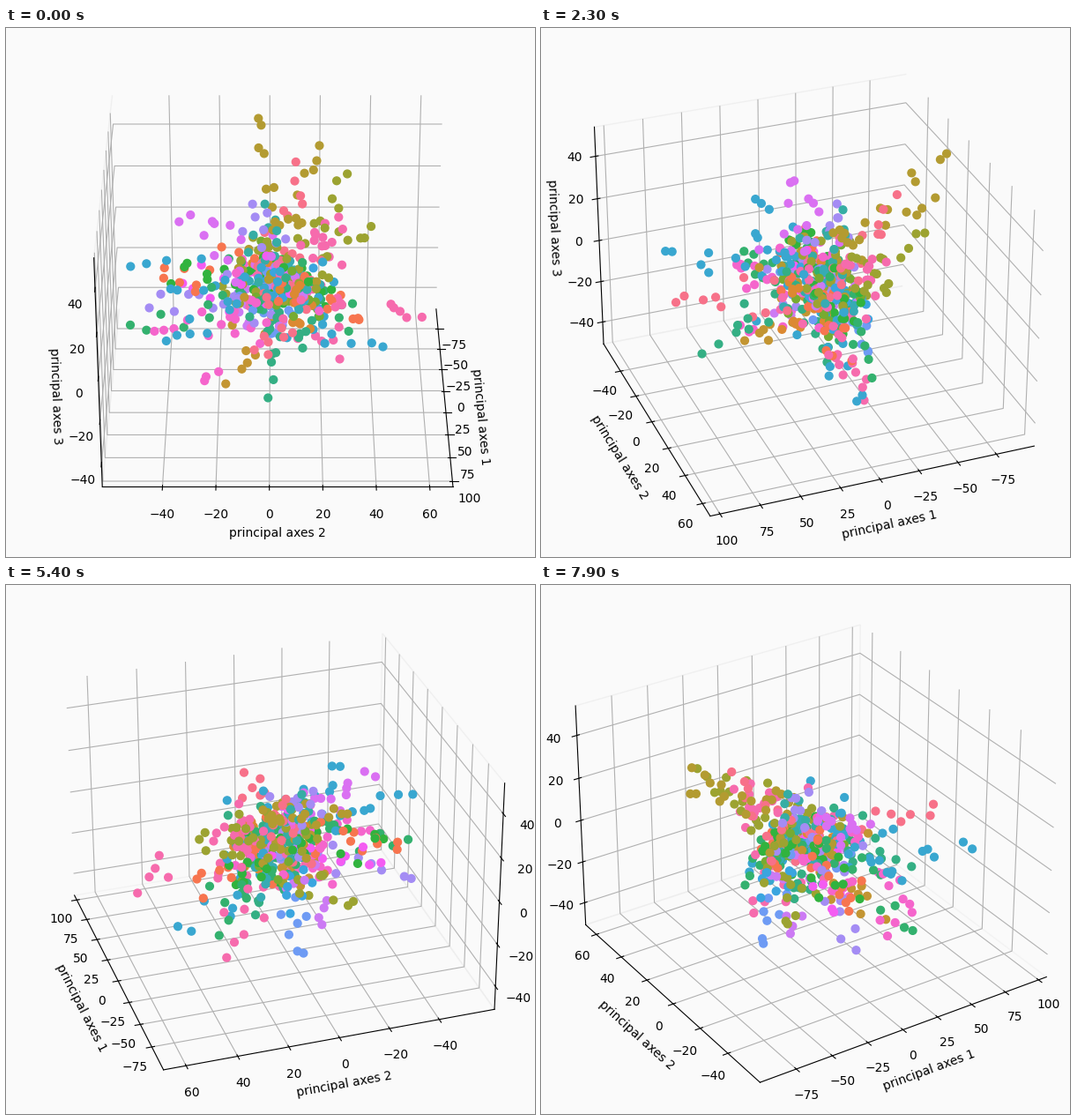
Recreate the animation shown at these times as a matplotlib script. Size 600 by 600 pixels, loop 8 s.

```python
import numpy as np
import matplotlib.pyplot as plt
from matplotlib.animation import FuncAnimation

FRAMES, INTERVAL, STEP = 80, 100, 3   # degrees of azimuth per frame
BG = "#fafafa"

# Every class fans out from a shared core towards one or more tips.
CORE = np.array([2, 4, 4])
SPREAD = np.array([15, 9, 8])
PER_ARM = 15
TIPS = {
    "#f77189": [(-42, 10, 38), (90, -3, 2)],
    "#f7754f": [(9, 38, -15), (-15, -42, -3)],
    "#dc8932": [(25, 10, -10)],
    "#c39532": [(32, -14, -32)],
    "#b39b31": [(-87, -4, 47), (-65, 19, 42)],
    "#9ca331": [(-50, 28, 33), (-22, 41, 18), (-33, -18, -18)],
    "#77ab31": [(5, 20, -10)],
    "#31b33e": [(-12, -38, -1), (-12, 22, -12)],
    "#33b16e": [(-20, 33, -26), (14, -52, -12)],
    "#34af84": [(70, 2, -23), (-2, 12, -31)],
    "#36ada4": [(-15, 0, 28)],
    "#37abb4": [(-15, 14, -12)],
    "#39a7d0": [(10, -54, 12), (75, -38, 3), (0, 43, -33)],
    "#3aa5df": [(-26, 2, -15)],
    "#6e9bf4": [(-38, 3, -40)],
    "#a48cf4": [(-18, -45, -17), (-20, -6, 30)],
    "#cc7af4": [(-32, -8, -27)],
    "#f45cf2": [(-18, -34, -10)],
    "#f565cc": [(30, -43, -8), (28, -26, -33)],
    "#f66bad": [(12, 60, -10), (-18, 29, -40), (-28, 27, 20)],
    "#da70f2": [(-5, -32, 29)],
}


def build_points():
    rng = np.random.default_rng(7)
    t = np.linspace(0, 1, PER_ARM)[:, None] ** 1.4
    points, colors = [], []
    for color, tips in TIPS.items():
        for tip in tips:
            noise = np.clip(rng.standard_normal((PER_ARM, 3)), -1.8, 1.8)
            points.append(CORE + t * (tip - CORE)
                          + noise * SPREAD * (1 - .75 * t))
            colors += [color] * PER_ARM
    return np.vstack(points), colors


fig = plt.figure(figsize=(6, 6), dpi=100, facecolor=BG)
ax = fig.add_axes([0, 0, 1, 1], projection="3d", facecolor=BG)

points, colors = build_points()
ax.scatter(*points.T, c=colors, s=40, depthshade=False)

ax.set(xlim=(-99.8, 106), ylim=(-62.5, 68.7), zlim=(-51, 53.6),
       xticks=range(-75, 101, 25), yticks=range(-40, 61, 20),
       zticks=range(-40, 41, 20), xlabel="principal axes 1",
       ylabel="principal axes 2", zlabel="principal axes 3")
for axis in (ax.xaxis, ax.yaxis, ax.zaxis):
    axis.pane.set_fill(False)
ax.xaxis.pane.set_edgecolor(BG)


def update(i):
    ax.view_init(elev=30, azim=STEP * i)
    return []


anim = FuncAnimation(fig, update, frames=FRAMES, interval=INTERVAL,
                     init_func=lambda: update(0), repeat=True, repeat_delay=0)
plt.show()
```
